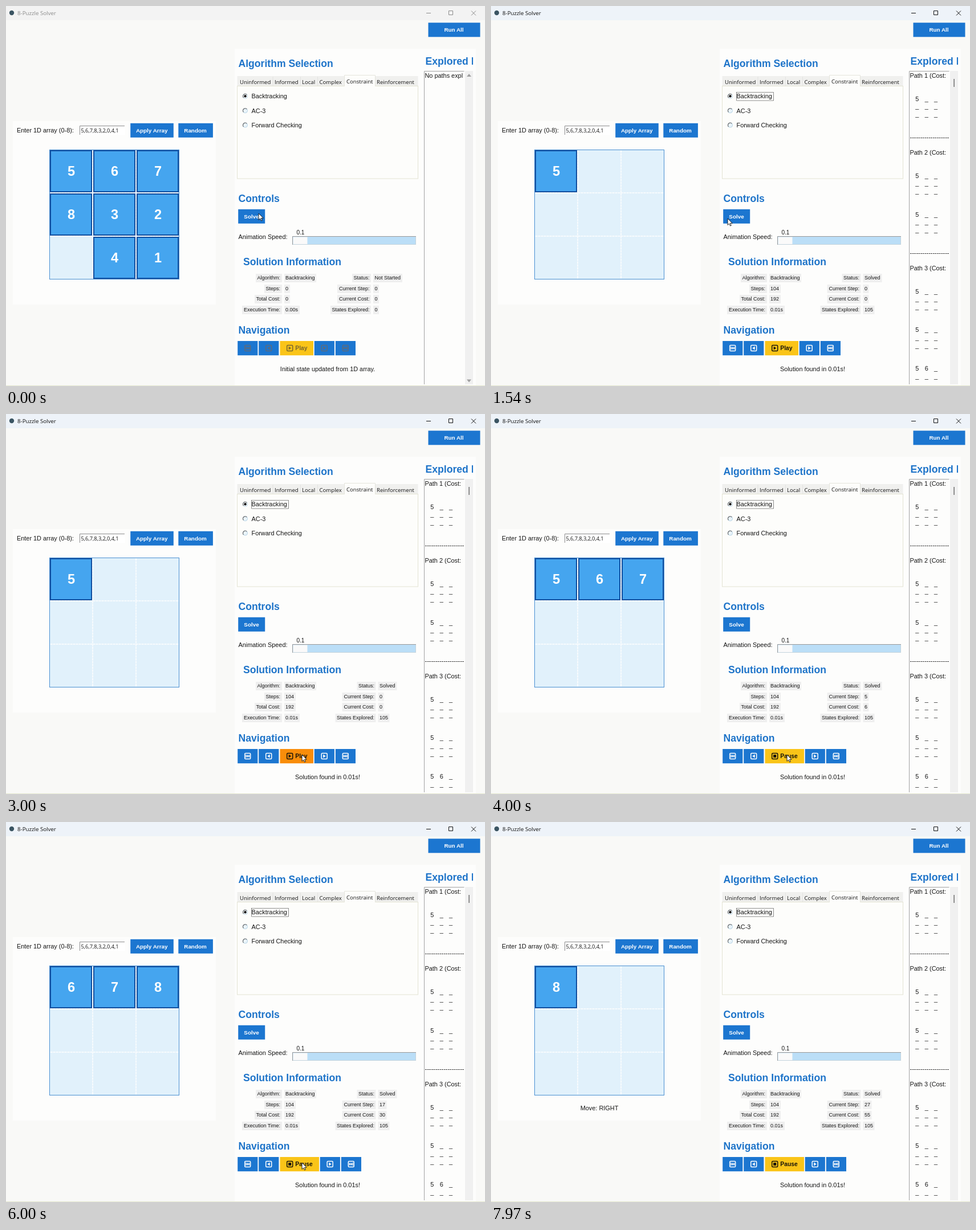
An HTML page that plays this animation: 840 by 667 pixels, repeating every 8 s.

```html
<!DOCTYPE html>
<html lang="en">
<head>
<meta charset="utf-8">
<title>8-Puzzle Solver</title>
<style>
html, body { margin: 0; width: 840px; height: 667px; overflow: hidden; background: #f9f9f7; }
#stage { position: relative; width: 840px; height: 667px; overflow: hidden; }
svg { position: absolute; left: 0; top: 0; }
text { font: 10.9px "Liberation Sans", Arial, sans-serif; fill: #151515; white-space: pre; }
.h { font-size: 17.6px; font-weight: bold; fill: #1e74c9; }
.b { font-size: 9.9px; font-weight: bold; fill: #fff; text-anchor: middle; }
.t { font: 9.6px "Open Sans", "Noto Sans", sans-serif; }
.m { text-anchor: middle; }
.d { font-size: 23.5px; font-weight: bold; fill: #fff; text-anchor: middle; }
.blue { fill: #1c76d0; }
.chip { position: absolute; height: 15px; padding: 0 2.5px; background: #efefef; color: #151515;
  font: 9px/15px "Liberation Sans", Arial, sans-serif; white-space: pre; }
#left, #right { position: absolute; left: 0; top: 0; width: 840px; }
</style>
</head>
<body>
<div id="stage">
<svg width="840" height="667" viewBox="0 0 840 667">
  <defs>
    <clipPath id="headClip"><rect x="730" y="80" width="89" height="30"/></clipPath>
    <clipPath id="listClip"><rect x="734" y="115" width="69" height="549"/></clipPath>
    <g id="frame" fill="none" stroke="currentColor" stroke-width="1.5">
      <rect x="-5" y="-5" width="10" height="10" rx="1.5"/>
    </g>
    <path id="prev" fill="currentColor" d="M2 -3V3L-2.5 0Z"/>
    <path id="next" fill="currentColor" d="M-2 -3V3L2.5 0Z"/>
    <path id="first" fill="currentColor" d="M-3.6 -2.7h1.3v5.4h-1.3ZM.6 -2.7v5.4L-2.3 0ZM3.6 -2.7v5.4L.6 0Z"/>
    <path id="last" fill="currentColor" d="M3.6 -2.7h-1.3v5.4h1.3ZM-.6 -2.7v5.4L2.3 0ZM-3.6 -2.7v5.4L-.6 0Z"/>
  </defs>

  <!-- window -->
  <rect id="bar" width="840" height="25"/>
  <circle cx="10" cy="12" r="4.2" fill="#3b5563"/>
  <g id="caption">
    <text class="t" x="20" y="15.6" style="font-size:9.7px;fill:currentColor">8-Puzzle Solver</text>
    <path d="M737 12.5h8M776.5 8.5h7v7h-7ZM816 8.5l8 8M824 8.5l-8 8" fill="none" stroke="currentColor"/>
  </g>
  <rect y="666" width="840" height="1" fill="#e4e6cd"/>
  <rect class="blue" x="740.5" y="29.3" width="91" height="25"/>
  <text class="b" x="785.5" y="45">Run All</text>

  <!-- board panel -->
  <rect x="12" y="202" width="356" height="322" fill="#fdfdfc"/>
  <text x="19" y="222">Enter 1D array (0-8):</text>
  <rect x="129.5" y="210" width="79" height="16.5" fill="#fff"/>
  <path d="M129.5 226V210.5H208" fill="none" stroke="#8c8c8c"/>
  <text class="t" x="131.5" y="221.8" style="font-size:9.3px">5,6,7,8,3,2,0,4,1</text>
  <rect class="blue" x="218.2" y="205.8" width="75.6" height="25"/>
  <text class="b" x="255.7" y="221.6">Apply Array</text>
  <rect class="blue" x="302.3" y="205.8" width="60.6" height="25"/>
  <text class="b" x="332" y="221.6">Random</text>
  <rect x="76.5" y="252.5" width="227" height="227" fill="#e1f1fb" stroke="#4a90d2"/>
  <path d="M152 253.5V479M228 253.5V479M77.5 328H303M77.5 404H303" stroke="#f7fbfd" stroke-width="2" stroke-dasharray="4 1"/>
  <g id="tiles"></g>
  <text id="move" class="m" x="190" y="506"></text>

  <!-- algorithm panel -->
  <rect x="401" y="75" width="423" height="591" fill="#fdfdfc"/>
  <text class="h" x="407.5" y="106.5">Algorithm Selection</text>
  <rect x="405.5" y="123" width="317" height="18" fill="#f0f0ee"/>
  <rect x="405.5" y="140.5" width="317" height="162.5" fill="#fdfdfb" stroke="#e3e3d3"/>
  <path d="M468 124v16M516.5 124v16M546.5 124v16" stroke="#e4e4e2"/>
  <path d="M593.5 141V121.5H647.5V141" fill="#fdfdfb" stroke="#e4e4dc"/>
  <g id="tabs"></g>
  <g id="radios"></g>
  <rect id="ring" x="430.5" y="151.5" width="65" height="14.5" fill="none" stroke="#222" stroke-dasharray="1 1"/>

  <text class="h" x="407.5" y="344">Controls</text>
  <rect class="blue" x="407.2" y="356.8" width="47" height="25"/>
  <text class="b" x="430.5" y="372.7">Solve</text>
  <text x="407.5" y="408.5">Animation Speed:</text>
  <text x="509.5" y="401" style="font-size:10px">0.1</text>
  <rect x="502.5" y="404.5" width="216" height="14" fill="#bbdef7" stroke="#c4d3dc"/>
  <path d="M502.5 419V404.5H719" fill="none" stroke="#999"/>
  <rect x="503.5" y="405.5" width="25" height="12.5" fill="#fafafa"/>

  <text class="h" x="416" y="455">Solution Information</text>
  <text class="h" x="407.5" y="575">Navigation</text>
  <g id="nav">
    <g id="head"></g>
    <g id="tail"></g>
  </g>
  <rect id="playBox" x="480.5" y="588" height="25.2"/>
  <g id="playInk">
    <g transform="translate(497.7 600.5)">
      <use href="#frame"/>
      <use id="playIcon" href="#next"/>
      <rect id="stopIcon" x="-2.5" y="-2.5" width="5" height="5" fill="currentColor"/>
    </g>
    <text id="playText" x="507.3" y="604.3" style="font-size:10.3px;font-weight:bold;fill:currentColor"></text>
  </g>
  <text id="status" class="m" x="564" y="641"></text>

  <!-- explored paths -->
  <g clip-path="url(#headClip)"><text class="h" x="735.5" y="102.5">Explored Paths</text></g>
  <path d="M733.5 664V114.5H803.5" fill="none" stroke="#a3a3a3"/>
  <g clip-path="url(#listClip)">
    <text id="noPaths" x="734.5" y="126">No paths expl</text>
    <g id="paths"></g>
  </g>
  <rect x="805" y="114" width="14" height="550" fill="#f0f0f0"/>
  <path id="arrows" d="M808 124l4 -5l4 5ZM808 655.5l4 5l4 -5Z" fill="#a0a0a0"/>
  <rect id="thumb" x="811.3" y="128" width="1.6" height="14" fill="#777"/>
</svg>
<div id="left"></div>
<div id="right"></div>
<svg width="840" height="667" viewBox="0 0 840 667">
  <path id="cursor" d="M0 0V11.5L2.7 9L4.5 13L6.3 12.2L4.5 8.3H8.2Z" fill="#fff" stroke="#111" stroke-width=".9"/>
</svg>
</div>
<script>
const LOOP = 8000, ACTIVE = 300, SOLVED = 400, PLAY = 3099, STEP0 = 2918, STEP = 181, LAST = 27;
const $ = id => document.getElementById(id);

// Backtracking trace: each placement is logged twice, each undo once.
const trace = [];
for (let v = 5; v <= 8; v++) {
  const run = [5, 6, 7, 8].filter(n => n >= v);
  for (let k = 1; k <= run.length; k++) trace.push(run.slice(0, k), run.slice(0, k));
  for (let k = run.length - 1; k >= 0; k--) trace.push(run.slice(0, k));
}

// Move of the first blank cell between consecutive states, and its cost.
const costs = { RIGHT: 2, LEFT: 4, "": 1 };
let total = 0;
const steps = trace.map((cells, i) => {
  const from = i ? trace[i - 1].length : 0, to = cells.length;
  const sameRow = Math.floor(from / 3) === Math.floor(to / 3);
  const move = !sameRow || from === to || !i ? "" : to > from ? "RIGHT" : "LEFT";
  if (i) total += costs[move];
  return { cells, move, cost: total };
});

const tileSvg = (n, i) => {
  if (!n) return "";
  const x = 77 + i % 3 * 76, y = 253 + Math.floor(i / 3) * 76;
  return `<rect x="${x + 1}" y="${y + 1}" width="72" height="72" fill="#45a5ef" stroke="#124f9f" stroke-width="2"/>` +
    `<text class="d" x="${x + 37.5}" y="${y + 45}">${n}</text>`;
};

const navButton = (x, icon) =>
  `<g transform="translate(${x} 588)"><rect class="blue" width="35.2" height="25.2"/>` +
  `<g transform="translate(17.5 12.5)"><use href="#frame"/><use href="#${icon}"/></g></g>`;

function buildPanels() {
  const tabs = [["Uninformed", 410], ["Informed", 471], ["Local", 519], ["Complex", 549.5], ["Constraint", 597], ["Reinforcement", 650]];
  $("tabs").innerHTML = tabs.map(([s, x]) =>
    `<text class="t" x="${x}" y="${s === "Constraint" ? 135.5 : 136.8}">${s}</text>`).join("");

  $("radios").innerHTML = ["Backtracking", "AC-3", "Forward Checking"].map((s, i) => {
    const y = 158.3 + i * 25.4;
    return `<circle cx="419.5" cy="${y}" r="4" fill="${i ? "#eaf4fa" : "#fff"}" stroke="#b5d3e6"/>` +
      `<path d="M416.5 ${y + 2.7}A4 4 0 0 1 422.4 ${y - 2.7}" fill="none" stroke="#666" stroke-width="1.2"/>` +
      (i ? "" : `<circle cx="419.5" cy="${y}" r="2.2" fill="#111"/>`) +
      `<text x="430.5" y="${y + 4}">${s}</text>`;
  }).join("");

  $("head").innerHTML = navButton(406.2, "first") + navButton(443.2, "prev");
  $("tail").innerHTML = navButton(540.7, "next") + navButton(577.8, "last");
}

function buildPaths() {
  const out = [], base = r => 126 + r * 13.53;
  let row = 0;
  for (let p = 1; p <= 3; p++) {
    out.push(`<text x="734.5" y="${base(row)}">Path ${p} (Cost:</text>`);
    row += 3;
    for (let s = 0; s < p; s++, row += 5)
      for (let i = 0; i < 9; i++)
        out.push(`<text class="m" x="${747.3 + i % 3 * 16.4}" y="${base(row + Math.floor(i / 3))}">${trace[s][i] || "_"}</text>`);
    out.push(`<text x="734.5" y="${base(row)}">${"-".repeat(30)}</text>`);
    row += 2;
  }
  $("paths").innerHTML = out.join("");
}

function chips(host, names, edge) {
  return names.map((name, i) => {
    const add = (text, side) => {
      const el = document.createElement("div");
      el.className = "chip";
      el.textContent = text;
      el.style.cssText = `top:${470 + i * 18.6}px;${side}`;
      host.append(el);
      return el;
    };
    add(name + ":", `right:${840 - edge}px`);
    return add("", `left:${edge + 4}px`);
  });
}

buildPanels();
buildPaths();
const fields = [
  ...chips($("left"), ["Algorithm", "Steps", "Total Cost", "Execution Time"], 483.5),
  ...chips($("right"), ["Status", "Current Step", "Current Cost", "States Explored"], 640)
];

// Pointer stops: time, x, y
const stops = [[0, 443, 364], [450, 443, 364], [1050, 415, 373], [2050, 415, 373], [2750, 519, 598], [7080, 519, 598], [7350, 530, 680], [LOOP, 530, 680]];
function pointer(t) {
  const i = stops.findIndex(s => s[0] > t);
  const [t0, x0, y0] = stops[i - 1], [t1, x1, y1] = stops[i];
  const u = (t - t0) / (t1 - t0), e = u * u * (3 - 2 * u);
  return [x0 + (x1 - x0) * e, y0 + (y1 - y0) * e];
}

const show = (id, on) => { $(id).style.display = on ? "" : "none"; };
let shown = "";

function render(t) {
  const active = t >= ACTIVE, solved = t >= SOLVED, playing = t >= PLAY;
  const n = playing ? Math.min(LAST, Math.floor((t - STEP0) / STEP)) : 0;
  const [x, y] = pointer(t);
  $("cursor").setAttribute("transform", `translate(${x.toFixed(1)} ${y.toFixed(1)})`);
  const hover = solved && !playing && x > 481 && x < 539 && y > 588 && y < 613;

  const key = [active, solved, playing, n, hover].join();
  if (key === shown) return;
  shown = key;

  const step = steps[n];
  $("bar").setAttribute("fill", active ? "#eef3f9" : "#f3f3f3");
  $("caption").style.color = active ? "#111" : "#8b8b8b";
  show("ring", active);
  $("tiles").innerHTML = (solved ? step.cells : [5, 6, 7, 8, 3, 2, 0, 4, 1]).map(tileSvg).join("");
  $("move").textContent = solved && step.move ? "Move: " + step.move : "";

  const values = solved
    ? ["Backtracking", 104, 192, "0.01s", "Solved", n, step.cost, 105]
    : ["Backtracking", 0, 0, "0.00s", "Not Started", 0, 0, 0];
  fields.forEach((f, i) => { f.textContent = values[i]; });
  $("right").style.transform = `translateX(${solved ? 8.5 : 0}px)`;

  $("nav").style.color = solved ? "#fff" : "#5d6b7c";
  $("tail").setAttribute("transform", `translate(${playing ? 10 : 0} 0)`);
  $("playBox").setAttribute("width", playing ? 68.5 : 58.5);
  $("playBox").setAttribute("fill", hover ? "#f98d0a" : "#fac418");
  $("playInk").style.color = solved ? "#17140a" : "#77662f";
  $("playText").textContent = playing ? "Pause" : "Play";
  show("playIcon", !playing);
  show("stopIcon", playing);

  $("status").textContent = solved ? "Solution found in 0.01s!" : "Initial state updated from 1D array.";
  show("noPaths", !solved);
  show("paths", solved);
  show("arrows", !solved);
  show("thumb", solved);
}

let start;
function tick(now) {
  start ??= now;
  render((now - start) % LOOP);
  requestAnimationFrame(tick);
}
render(0);
requestAnimationFrame(tick);
</script>
</body>
</html>
```
